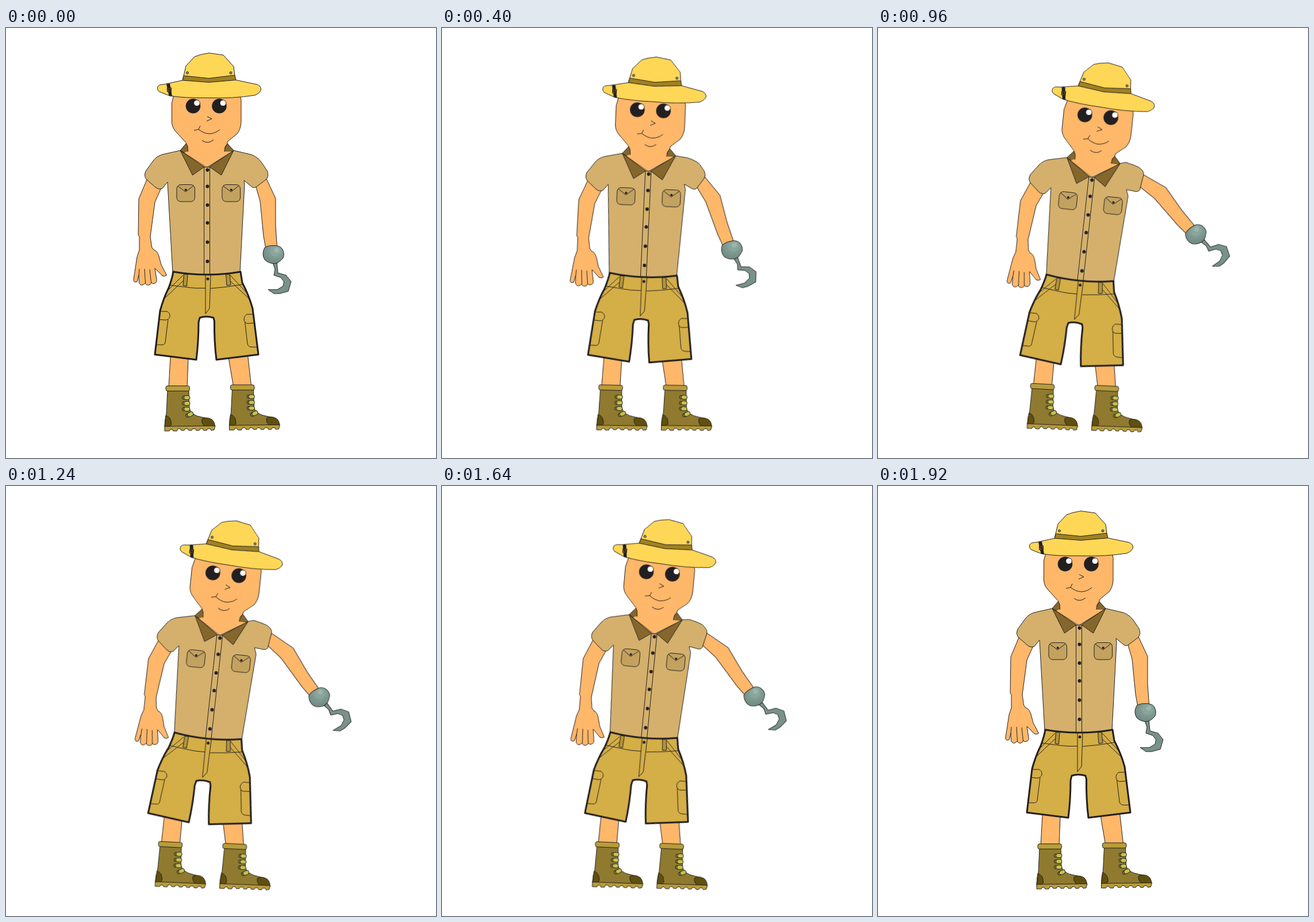
Write an HTML page that moves like this. It is 748 px wide and 748 px high and loops after 1960 ms.

```html
<!DOCTYPE html>
<html lang="en">
<head>
<meta charset="utf-8">
<title>Explorer with a hook</title>
<style>
html, body { margin: 0; width: 100%; height: 100%; overflow: hidden; background: #fff; }
svg { display: block; width: 100vw; height: 100vh; }
svg * { stroke-linejoin: round; }
.line { stroke: #231f20; stroke-width: 1; }
.open { fill: none; }
.skin { fill: #ffb769; }
.shirt { fill: #d4b06c; }
.pocket { fill: #c3a25f; }
.collar { fill: #85672c; }
.shorts { fill: #d4ae46; }
.hem { stroke-width: 3; }
.loop { fill: #b1933a; }
.boot { fill: #8f7a2f; }
.trim { fill: #b99c3a; }
.dark { fill: #60500f; }
.lace { fill: #c5c34c; }
.hat { fill: #ffd757; }
.band { fill: #a08122; }
.ink { fill: #231f20; stroke: none; }
.steel { fill: #78928a; }

/* Each part leans by its own shift (--x, --y) and turn (--r) around its middle. */
.lean { animation: lean 1960ms linear infinite; }
.wave { animation: wave 1960ms linear infinite; transform-origin: 446px 266px; }

.leg-l { --x: -14.7px; --y: -2.3px; --r: 3deg; transform-origin: 319.5px 662px; }
.leg-r { --x: -15px; --y: 2.2px; --r: 2.8deg; transform-origin: 422px 658px; }
.arm-l { --x: 10px; --y: 5.5px; --r: 5.8deg; transform-origin: 255px 363.5px; }
.arm-r { --x: 0px; --y: 0px; --r: -35.2deg; transform-origin: 455px 237px; }
.trunk { --x: 13px; --y: 17px; --r: 6.3deg; transform-origin: 350.5px 326.5px; }
.hips { --x: -5.2px; --y: 10.2px; --r: 5.6deg; transform-origin: 349.2px 496px; }
.head { --x: 34.2px; --y: 17.8px; --r: 6deg; transform-origin: 348.2px 135.8px; }
.cap { --x: 38.2px; --y: 16.5px; --r: 8.7deg; transform-origin: 353.2px 107px; }

/* The right sleeve follows the raised arm. */
.torso {
  --rest: path("M303 213L272 220Q262 223 256 231L243 249Q239 258 245 264L260 277Q266 282 272 279L281 268L290 426Q350 434 407 426L415 272L414 265L426 275Q431 280 436 276L453 263Q458 257 454 248L444 233Q437 224 426 220L396 213L350 242Z");
  --raised: path("M303 213L272 220Q262 223 256 231L243 249Q239 258 245 264L260 277Q266 282 272 279L281 268L290 426Q350 434 407 426L416 268L412 257L424 258Q432 260 435 255L438 233Q440 225 436 221L431 217Q426 214 405 210L396 213L350 242Z");
  d: var(--rest);
  animation: torso 1960ms linear infinite;
}

@keyframes lean {
  0% { transform: translate(0, 0) rotate(0deg); animation-timing-function: steps(24); }
  48.97% { transform: translate(var(--x), var(--y)) rotate(var(--r)); }
  81.63% { transform: translate(var(--x), var(--y)) rotate(var(--r)); animation-timing-function: steps(8); }
  97.95%, 100% { transform: translate(0, 0) rotate(0deg); }
}
@keyframes wave {
  0% { transform: rotate(0deg); }
  48.97% { transform: rotate(0deg); animation-timing-function: steps(8); }
  65.3% { transform: rotate(5.4deg); animation-timing-function: steps(4); }
  73.46% { transform: rotate(-5.4deg); animation-timing-function: steps(4); }
  81.63%, 100% { transform: rotate(0deg); }
}
@keyframes torso {
  0% { d: var(--rest); animation-timing-function: steps(24); }
  48.97% { d: var(--raised); }
  81.63% { d: var(--raised); animation-timing-function: steps(8); }
  97.95%, 100% { d: var(--rest); }
}
</style>
</head>
<body>
<svg viewBox="0 0 748 748" xmlns="http://www.w3.org/2000/svg">
  <defs>
    <radialGradient id="ball" cx=".62" cy=".3" r=".75">
      <stop offset="0" stop-color="#a3bdb3"/>
      <stop offset=".4" stop-color="#829d94"/>
      <stop offset="1" stop-color="#6d8780"/>
    </radialGradient>
    <g id="eyelet">
      <circle class="line boot" cx="309.5" cy="643" r="3"/>
      <rect class="line lace" x="309.5" y="639.5" width="10.500" height="7" rx="3.5"/>
    </g>
    <g id="shoe" class="line">
      <path class="boot" d="M281 630L318 630L319 662Q322 674 341 677Q361 679 363 693L276 694Q276 682 279 671Z"/>
      <path class="dark" d="M278 674Q288 677 287.5 690L285 693L276 693Z"/>
      <path class="dark" d="M341 680Q350 676 358 681Q363 685 363.5 693L346 693Q339 687 341 680Z"/>
      <path class="trim" d="M276 693L364 692L362 699L357 700L355 697L351 697L349 700L344 700L342 697L338 697L336 700L331 700L329 697L325 697L323 700L318 700L316 697L312 697L310 700L305 700L303 697L299 697L297 701L291 701L289 698L286 698L284 701L276 701Z"/>
      <rect class="trim" x="278" y="622.5" width="41.5" height="9" rx="3"/>
      <use href="#eyelet"/>
      <use href="#eyelet" y="10"/>
      <use href="#eyelet" y="20"/>
      <use href="#eyelet" transform="rotate(-25 314 643) translate(-7 29)"/>
    </g>
    <g id="pocket" class="line">
      <rect class="pocket" x="297" y="272.5" width="31.5" height="29.5" rx="7"/>
      <path class="open" d="M299 275L312.5 285L326.5 274"/>
      <circle class="ink" cx="312.7" cy="281.5" r="2"/>
    </g>
    <g id="eye">
      <circle class="ink" cx="325.5" cy="135.7" r="12.8"/>
      <circle fill="#fff" cx="332" cy="130.5" r="5.3"/>
    </g>
  </defs>

  <g class="lean leg-l">
    <path class="line skin" d="M287 550L286 573L283 626L315 626L317 576L318 550Z"/>
    <use href="#shoe"/>
  </g>
  <g class="lean leg-r">
    <path class="line skin" d="M383 550L387 573L396 626L427 626L421 573L418 550Z"/>
    <use href="#shoe" x="112.5" y="-1.7"/>
  </g>

  <g class="lean arm-l line">
    <path class="skin" d="M247 259L231 297L230 360L232 363L232 386L228 398L222 437Q221 442 226 442Q229 442 229 438L231 430L231.5 443Q233 448 238 447L242 444Q244 448 249 447Q252 446 252.5 443Q255 446 259 444Q263 442 262 437L259 418L272 431Q276 433 279.5 430L270 412L266 397Q263 387 257 386L253.5 381L251 363L259 303L271 276L262 262Z"/>
    <path class="open" d="M232 419L231 431M241 419L242.5 444M250 420L252.5 443"/>
  </g>

  <g class="wave">
    <g class="lean arm-r line">
      <path class="skin" d="M425 255L433 270L442 301L448 362L452 384L472 384L471.5 380L469 345L469 296.5L452 260L445 245Z"/>
      <path class="steel" d="M464 408L471 406L473 426L487 430L496 441L491 458L476 462L466 462L456 455L472 455L482 449L483.5 441L478 434L466 430L468 420Z"/>
      <path fill="url(#ball)" d="M450 382Q456 378 466 378.5Q477 378 481 385Q485 393 482 400Q475 409 466 410Q456 409 450 403Q444 393 450 382Z"/>
      <g stroke="none">
        <circle fill="#8aa59b" cx="468.5" cy="388.5" r="9"/>
        <circle fill="#9bb5ab" cx="471" cy="386.5" r="4.5"/>
      </g>
    </g>
  </g>

  <g class="lean trunk line">
    <path class="torso shirt"/>
    <path class="open" d="M344.5 430V242H354.5V430"/>
    <g class="ink">
      <circle cx="350.5" cy="247" r="3"/>
      <circle cx="350.5" cy="275.5" r="3"/>
      <circle cx="350.5" cy="308" r="3"/>
      <circle cx="350.5" cy="339" r="3"/>
      <circle cx="350.5" cy="372.5" r="3"/>
      <circle cx="350.5" cy="406" r="3"/>
    </g>
    <use href="#pocket"/>
    <use href="#pocket" x="79"/>
    <path class="collar" d="M303 213L315 199L321 216L312 218ZM396 213L385 201L377 216L390 217Z"/>
    <path class="skin" stroke="none" d="M317 200L381 200L380 215L393 215L349 241.5L310 217L317 214Z"/>
    <path class="collar" d="M303 213L345 241.5L324.5 256ZM396 213L354 241.5L374.5 256Z"/>
  </g>

  <g class="lean hips line">
    <path class="shorts hem" d="M291 424Q320 429 350 429Q380 429 408 424L411 443Q423 466 429 488L439 568L366 577Q362 545 362.5 510L361 504Q348 500 337 504L335 512Q335 545 331 577L259 568L268 492Q274 470 283 452Q289 436 291 424Z"/>
    <path class="loop" d="M309.5 428L316 429L314.5 449L308 448ZM382.5 429L389 428L391 447L384 448Z"/>
    <path class="open" d="M284 447Q312 451 330 452.5L347 452.5M356 453Q385 451 412 446M347 430L347 497L354 488L356 430M308 430L279 459M308 440L276 470M390 430L421 463M391 441L424 472"/>
    <path class="open" d="M269 493L280 493Q286 496 285 502Q283 508 277 508L266 507M282 507L277 547Q276 552 269 551L262 551M430 498L419 498Q414 501 414 507Q415 514 421 514L432 513M415.5 511L420 549Q421 555 428 555L436 555"/>
    <circle class="ink" cx="351" cy="436.5" r="2.5"/>
  </g>

  <g class="lean head line">
    <path class="skin" d="M316.5 215L316 206Q314 199 308 194L297 182Q289 174 288.5 164L288.5 130L293 112L406 112L409 125L409 164Q408 177 402 184L386 197L384 203Q380 206 380 215"/>
    <use href="#eye"/>
    <use href="#eye" x="45.5"/>
    <path class="open" d="M350 154L358 158L349 162M327 178L335 176.5L338 170M335 176.5Q345 184 354 184Q365 183 372 176.5M341 195.5Q351 203 361 194.5"/>
  </g>

  <g class="lean cap line">
    <path class="hat" d="M307 91L309 83L313 66L328 50L338 46.5L353 43.5L378 47L396 67L399 91Z"/>
    <path class="band" d="M309 83L353 87.5L398 82L400 91L353 96L307 92Z"/>
    <path class="hat" d="M307 91L353 94.5L400 90.5L436 98Q444 101 443.5 107Q442 113 433 117Q395 123 350 121.5Q310 122 285 118L267 111Q262 108 264 102Q266 98 275 98Z"/>
    <path class="ink" d="M279 97.5L285 96.5L289 118.5L283.5 118Z"/>
    <rect class="open" x="280.5" y="104" width="7" height="7"/>
    <path class="open" style="stroke: #8a7430; stroke-width: .6" d="M282 105H286V110H282Z"/>
    <g fill="#8d9a8c">
      <circle cx="315.5" cy="78" r="2"/>
      <circle cx="391" cy="78" r="2"/>
    </g>
  </g>
</svg>
</body>
</html>
```
